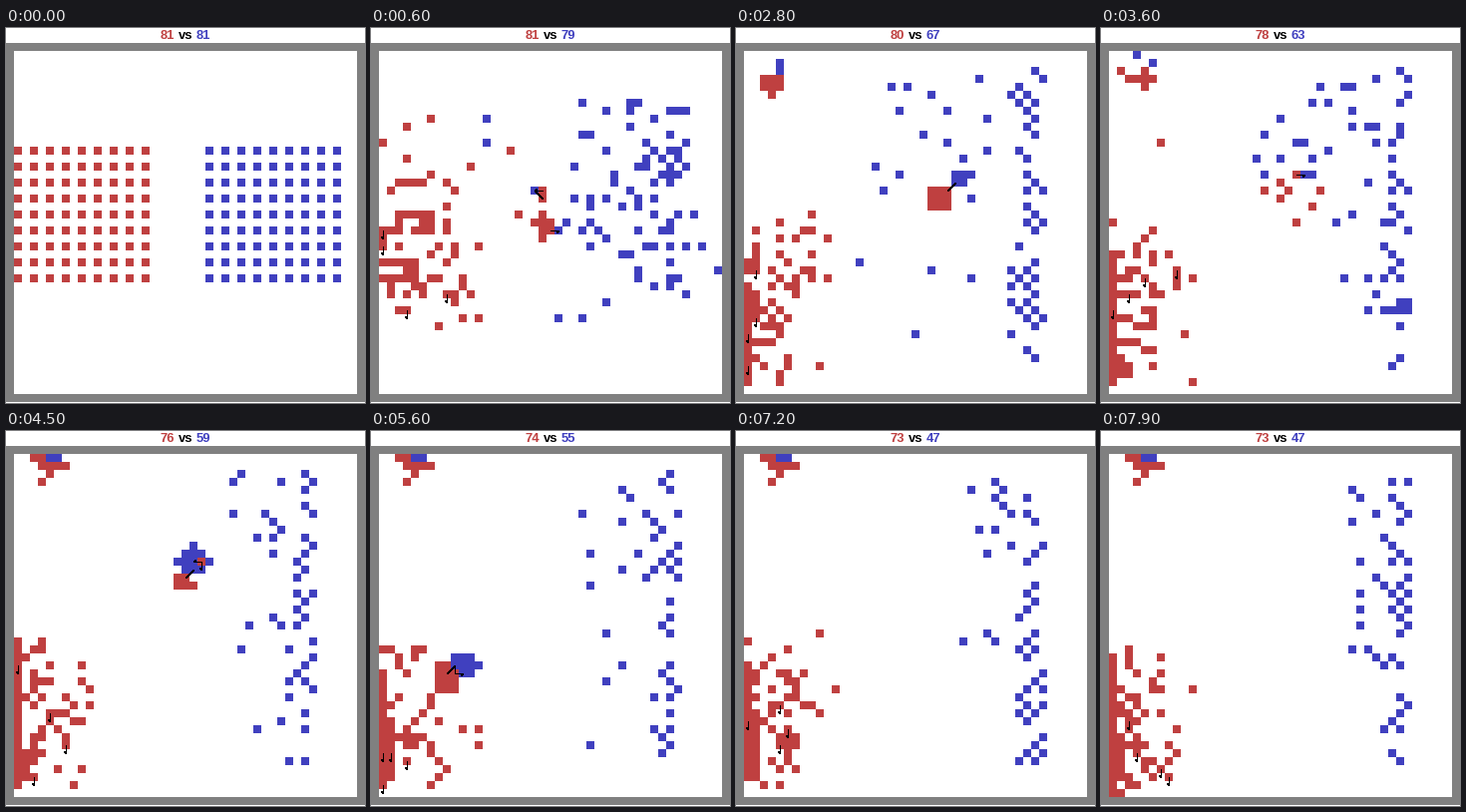
A matplotlib script that plays this animation: 360x376 px, repeating every 8 s.

```python
from collections import namedtuple
import itertools

import matplotlib.pyplot as plt
import numpy as np
from matplotlib.animation import FuncAnimation
from matplotlib.collections import LineCollection
from matplotlib.patches import Rectangle

W, H, DPI = 360, 376, 100
FRAMES, INTERVAL = 80, 100
N, CELL, LEFT, TOP = 43, 8, 8, 23
RED, BLUE, GREY = "#bf4040", "#4040bf", "#808080"
RGB = np.array([(191, 64, 64), (64, 64, 191)], np.uint8)
rng = np.random.default_rng(12)
CELLS = list(itertools.product(range(N), repeat=2))

# blobs are (team, col, row, size); wall is a row span, stray the leftmost blue
Scene = namedtuple("Scene", "t counts wall swarm stray blobs")
SCENES = [
    Scene(15, (80, 76), (22, 29), (15, 40), 21,
          [(0, 1.5, 7.5, 4), (1, 4, 6.5, 2), (0, 23.4, 20.6, 10), (1, 24.8, 19, 6)]),
    Scene(28, (80, 67), (30, 40), (18, 42), 13,
          [(0, 3, 3.6, 7), (1, 4, 1.6, 2), (0, 24, 18.2, 9), (1, 26.6, 15.4, 5)]),
    Scene(45, (76, 59), (23, 40), (21, 42), 27,
          [(0, 23, 13, 1), (0, 21, 15.6, 5), (1, 22, 12.8, 12)]),
    Scene(56, (74, 55), (27, 40), (22, 42), 26,
          [(0, 8, 27.6, 11), (1, 10.3, 25.8, 10)]),
    Scene(72, (73, 47), (27, 40), (21, 42), 27, []),
    Scene(79, (73, 47), (25, 42), (23, 42), 31, []),
]


def corner():
    """Reds that pin two blues against the top edge."""
    reds = [(c, 1) for c in range(3, 7)] + [(2, 0), (3, 0), (4, 2), (3, 3)]
    return reds, [(4, 0), (5, 0)]


def blob(x, y, size):
    return sorted(CELLS, key=lambda p: (p[0] - x) ** 2 + (p[1] - y) ** 2)[:size]


def swarm_cell(scene):
    """A loose red: packed on the left wall, thinning to the right."""
    lo, hi = scene.swarm
    row = int(rng.triangular(lo, lo + .65 * (hi - lo), hi + 1))
    return min(int(abs(rng.normal(0, 4.5))), 12), row


def spine_cell(scene):
    """A loose blue: a diagonal lattice down the right side, a few strays."""
    early = scene.t < 20
    if rng.random() < .25:
        row = int(rng.triangular(2, 4, 38))
        col = int(rng.integers(scene.stray, 34))
    else:
        row = int(rng.integers(2, 30 if early else 39))
        col = int(rng.choice((34, 35, 36, 37), p=(.15, .2, .35, .3)))
    return col - (col + row) % 2, row


def layout(scene):
    """Place both teams on distinct cells, landmarks first."""
    teams, used = ([], []), set()

    def add(team, cells):
        for cell in cells:
            if cell not in used and len(teams[team]) < scene.counts[team]:
                used.add(cell)
                teams[team].append(cell)

    top, bottom = scene.wall
    add(0, [(0, r) for r in range(top, bottom + 1)])
    if scene.t > 40:
        for team, cells in enumerate(corner()):
            add(team, cells)
        add(0, [(1, r) for r in range(37, 41)])
    for team, x, y, size in scene.blobs:
        add(team, blob(x, y, size))
    for team, loose in enumerate((swarm_cell, spine_cell)):
        while len(teams[team]) < scene.counts[team]:
            add(team, [loose(scene)])
    return [np.array(team, float) for team in teams]


def match(units, goals):
    """Give each goal its nearest free unit, hardest goals first."""
    dist = ((units[:, None] - goals[None]) ** 2).sum(2)
    near = dist.min(0)
    owner = {}
    for g in np.argsort(-np.where(near == 0, np.inf, near)):
        u = int(dist[:, g].argmin())
        dist[u] = np.inf
        owner[u] = goals[g]
    return owner


def walk(a, b, steps, ease=1.0):
    """Jittery path that starts at a and ends at b."""
    u = np.linspace(0, 1, steps + 1)[:, None]
    path = a + (b - a) * (1 - (1 - u) ** ease)
    if (a != b).any():
        drift = np.cumsum(rng.normal(0, .55, (steps + 1, 2)), 0)
        drift -= drift[0]
        path = path + drift - u * drift[-1]
    return path


def team_paths(first, stages):
    """Positions per unit and frame; NaN once the unit is dead."""
    paths = np.full((len(first), FRAMES, 2), np.nan)
    alive, pos, start = list(range(len(first))), first.copy(), 0
    for end, goals in stages:
        owner = match(pos[alive], goals)
        steps, lost = end - start, len(alive) - len(goals)
        left, fallen = [], 0
        for i, unit in enumerate(alive):
            if i in owner:
                ease = 1.0 if start else 1.6
                paths[unit, start:end + 1] = walk(pos[unit], owner[i], steps, ease)
                pos[unit] = owner[i]
                left.append(unit)
            else:
                fallen += 1
                life = max(1, round(steps * fallen / (lost + 1)))
                path = walk(pos[unit], pos[unit] + .01, steps)
                paths[unit, start:start + life] = path[:life]
        alive, start = left, end
    return paths


def grid(col):
    return np.array([(c, r) for c in range(col, col + 17, 2)
                     for r in range(12, 29, 2)], float)


layouts = [layout(s) for s in SCENES]
paths = [team_paths(grid(col), [(s.t, lay[k]) for s, lay in zip(SCENES, layouts)])
         for k, col in enumerate((0, 24))]
SPIRAL = sorted(itertools.product(range(-6, 7), repeat=2),
                key=lambda d: d[0] ** 2 + d[1] ** 2)


def place(t):
    """Snap every living unit to its own cell: {(col, row): team}."""
    board = {}
    for team, path in enumerate(paths):
        for x, y in path[~np.isnan(path[:, t, 0]), t]:
            c = min(max(round(x), 0), N - 1)
            r = min(max(round(y), 0), N - 1)
            for dc, dr in SPIRAL:
                cell = c + dc, r + dr
                if cell not in board and 0 <= min(cell) and max(cell) < N:
                    board[cell] = team
                    break
    return board


def strikes(t, board):
    """Hits as (col, row, dx, dy): some in the fight, some at home."""
    if t < 4:
        return []
    local = np.random.default_rng(t)
    reds = [cell for cell, team in board.items() if team == 0]
    fights = [(c, r, dx, dy) for c, r in reds
              for dx, dy in itertools.product((-1, 0, 1), repeat=2)
              if board.get((c + dx, r + dy)) == 1 and r > 3]
    home = [(c, r, 0, 1) for c, r in reds if c < 9 and 15 < r < N - 1]
    return [pool[i] for pool, k in ((fights, 3), (home, 4))
            for i in local.permutation(len(pool))[:k]]


def arrow(c, r, dx, dy):
    x, y = LEFT + CELL * c + 4.5, TOP + CELL * r + 4.5
    tx, ty = x + CELL * dx, y + CELL * dy
    barb = tx - 2 * dx - 2 * abs(dy), ty - 2 * dy + 2 * dx
    return [(x, y), (tx, ty), barb]


fig = plt.figure(figsize=(W / DPI, H / DPI), dpi=DPI, facecolor="white")
ax = fig.add_axes([0, 0, 1, 1])
ax.add_patch(Rectangle((0, 15), W, 360, color=GREY, lw=0, antialiased=False))
field = ax.imshow(np.full((N, N, 3), 255, np.uint8), interpolation="nearest",
                  extent=(LEFT, LEFT + N * CELL, TOP + N * CELL, TOP),
                  aspect="auto", zorder=2)
arrows = LineCollection([], colors="black", linewidths=72 / DPI,
                        antialiaseds=False, zorder=3)
ax.add_collection(arrows)
ax.set(xlim=(0, W), ylim=(H, 0))
ax.axis("off")


def label(x, text, color):
    return ax.text(x, 11, text, color=color, ha="center", va="baseline",
                   family="Liberation Sans", weight="bold", size=13 * 72 / DPI)


scores = [label(161.9, "81", RED), label(198.1, "81", BLUE)]
label(180, "vs", "black")


def draw(t):
    board = place(t)
    pixels = np.full((N, N, 3), 255, np.uint8)
    for (c, r), team in board.items():
        pixels[r, c] = RGB[team]
    field.set_data(pixels)
    arrows.set_segments([arrow(*hit) for hit in strikes(t, board)])
    for score, path in zip(scores, paths):
        score.set_text(str(int((~np.isnan(path[:, t, 0])).sum())))
    return [field, arrows, *scores]


anim = FuncAnimation(fig, draw, frames=FRAMES, interval=INTERVAL,
                     init_func=lambda: [], repeat=True, repeat_delay=0)
plt.show()
```
